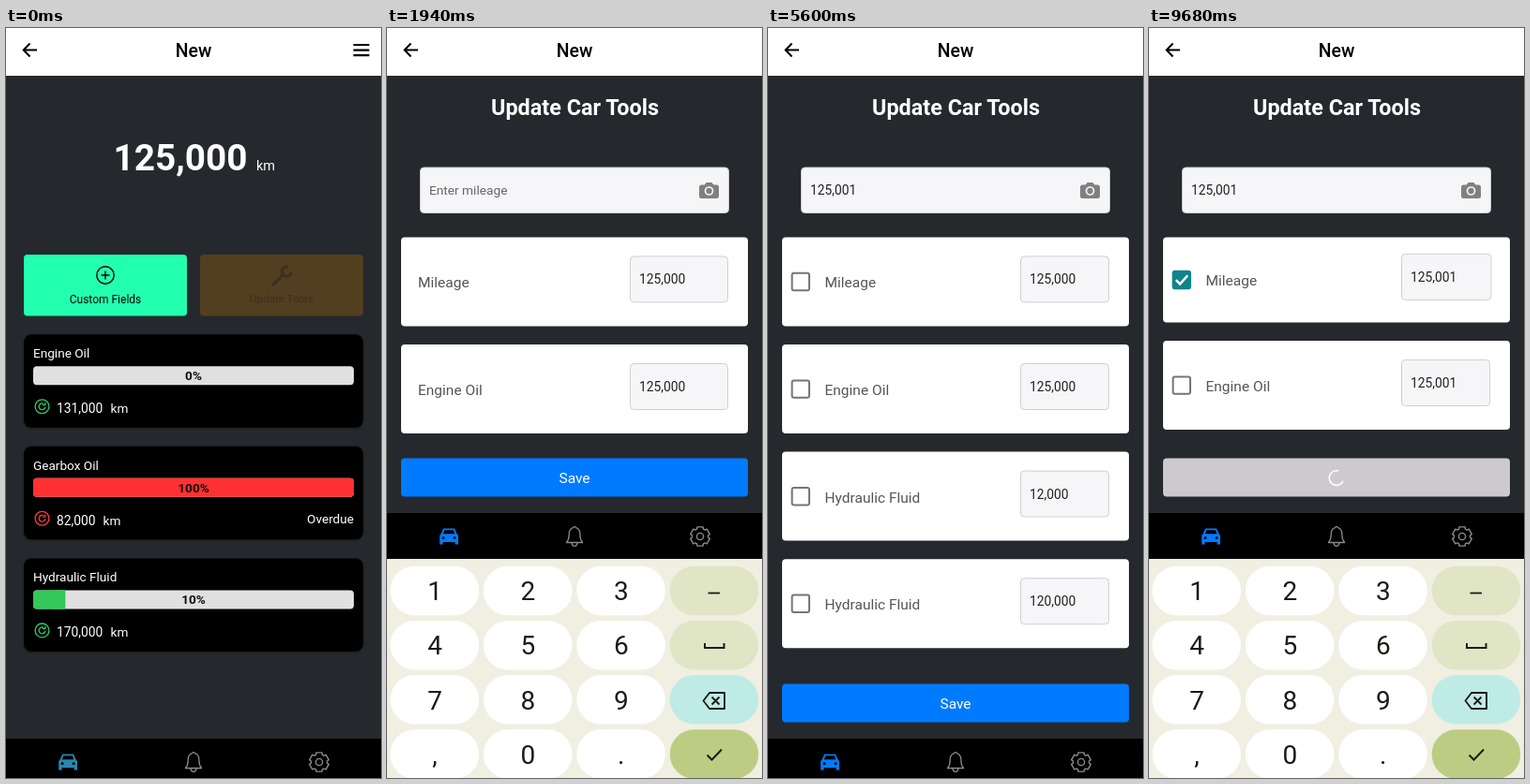
An HTML page that plays this animation: 400x801 px, repeating every 9.75 s.

```html
<!DOCTYPE html>
<html lang="en">
<head>
<meta charset="utf-8">
<title>Car tools</title>
<style>
  html, body { margin: 0; width: 100%; height: 100%; overflow: hidden; background: #fff; }
  svg { display: block; width: 400px; height: 801px; }
  text { font-family: Roboto, "Noto Sans", sans-serif; white-space: pre; }
</style>
</head>
<body>
<svg id="stage" viewBox="0 0 400 801" xmlns="http://www.w3.org/2000/svg"></svg>
<script>
const LOOP = 9750;
const BG = '#25292e';
const LIFT = 241;

// ---------- markup helpers ----------
const rect = (x, y, w, h, r, fill, more = '') =>
  `<rect x="${x}" y="${y}" width="${w}" height="${h}" rx="${r}" fill="${fill}" ${more}/>`;
const text = (x, y, size, fill, str, more = '') =>
  `<text x="${x}" y="${y}" font-size="${size}" fill="${fill}" ${more}>${str}</text>`;
const line = (d, color, w, more = '') =>
  `<path d="${d}" fill="none" stroke="${color}" stroke-width="${w}" ${more}/>`;
const mid = 'text-anchor="middle"';
const bold = 'font-weight="700"';
const round = 'stroke-linecap="round" stroke-linejoin="round"';

const header = menu =>
  rect(0, 0, 400, 51, 0, '#fff') +
  text(200, 31, 19.4, '#000', 'New', mid + ' font-weight="500"') +
  line('M33 23.5H19M25.5 16.5L18.7 23.5L25.5 30.5', '#000', 2) +
  (menu ? line('M370.5 18H387.5M370.5 23.6H387.5M370.5 29.2H387.5', '#000', 2.2) : '');

// ---------- home ----------
const reload = (y, color) =>
  `<g transform="translate(38.5 ${y})">` +
  `<circle r="7.4" fill="none" stroke="${color}" stroke-width="1.3"/>` +
  line('M3.4 .3A3.4 3.4 0 1 1 1.6 -3M3.3 -4.4V-1.7H.6', color, 1.3) + '</g>';

function meter(y, name, pct, color, value, kmX, note) {
  return rect(19, y, 362, 99.5, 8, '#000', 'filter="url(#soft)"') +
    text(29, y + 25, 13.6, '#fff', name) +
    rect(29, y + 34, 342, 20, 4, '#e0e0e0') +
    (pct ? rect(29, y + 34, 3.42 * pct, 20, 4, color) : '') +
    (pct && pct < 100 ? rect(50, y + 34, 3.42 * pct - 21, 20, 0, color) : '') +
    text(200, y + 49, 13.6, '#111', pct + '%', mid + ' ' + bold) +
    reload(y + 77, pct === 100 ? '#ff3b3b' : '#2ecc71') +
    text(54, y + 84, 13.8, '#fff', value) +
    text(kmX, y + 84, 13.6, '#fff', 'km') +
    (note ? text(371, y + 82, 13.6, '#fff', note, 'text-anchor="end"') : '');
}

const home =
  rect(0, 0, 400, 759, 0, BG) + header(true) +
  text(114.5, 152, 38.8, '#fff', '125,000', bold) +
  text(267, 152, 14.5, '#fff', 'km') +
  rect(19, 242, 174, 65.5, 4, '#22ffaf') +
  '<circle cx="106" cy="264" r="9.2" fill="none" stroke="#000" stroke-width="1.4"/>' +
  line('M101.5 264H110.5M106 259.5V268.5', '#000', 1.4) +
  text(106, 294, 12, '#000', 'Custom Fields', mid) +
  rect(207, 242, 174, 65.5, 4, '#523f20') +
  line('M285 274L296 263', '#3c3020', 3.6, round) +
  '<circle cx="299" cy="260" r="5" fill="none" stroke="#3c3020" stroke-width="3" stroke-dasharray="24 8" stroke-dashoffset="-1"/>' +
  text(294, 293, 11.6, '#3c3020', 'Update Tools', mid) +
  meter(327.3, 'Engine Oil', 0, '', '131,000', 111.5) +
  meter(446.8, 'Gearbox Oil', 100, '#ff3132', '82,000', 103.5, 'Overdue') +
  meter(566.4, 'Hydraulic Fluid', 10, '#34c759', '170,000', 111.5);

// ---------- form ----------
const field = 'stroke="#cfcfd2" stroke-width="1"';
const names = ['Mileage', 'Engine Oil', 'Hydraulic Fluid', 'Hydraulic Fluid'];

const cardMarkup = (name, i) =>
  `<g id="card${i}">` +
  rect(15, 0, 370, 95, 4, '#fff') +
  '<g class="box">' + rect(25.6, 38.4, 18.4, 18.4, 2, '#fff', 'stroke="#757575" stroke-width="2"') +
  line('M28.8 47.8L33 52L41.2 43', '#fff', 2.4, 'class="tick"') + '</g>' +
  text(33, 54, 15.5, '#555', name, 'class="name"') +
  rect(259.5, 20.5, 104, 49, 4, '#f6f5f7', field + ' class="field"') +
  text(269, 50, 13.8, '#222', '', 'class="value"') +
  rect(0, 35, 1.3, 20, 0, '#2aa8a0', 'class="caret"') + '</g>';

const camera =
  '<g fill="#808080"><rect x="333" y="167.5" width="21" height="14.5" rx="2.5"/>' +
  '<path d="M338 168.5L340.5 165H346.5L349 168.5Z"/></g>' +
  '<circle cx="343.5" cy="174" r="4" fill="none" stroke="#f6f5f8" stroke-width="1.7"/>';

const form =
  rect(0, 0, 400, 759, 0, BG) + header(false) +
  text(200.5, 92.5, 23.4, '#fff', 'Update Car Tools', mid + ' ' + bold) +
  rect(35.5, 149, 329, 48.5, 4, '#f6f5f8', field) + camera +
  text(45, 178, 13.8, '#222', '', 'id="entry"') +
  rect(0, 164, 1.3, 19, 0, '#2aa8a0', 'id="caret"') +
  `<g id="list" clip-path="url(#listClip)">${names.map(cardMarkup).join('')}</g>` +
  '<g id="save">' + rect(15, 700.5, 370, 41, 4, '#007bff', 'id="saveBg"') +
  text(200, 727, 15.5, '#fff', 'Save', mid + ' id="saveText"') +
  '<circle id="spin" cx="200" cy="721.5" r="7.8" fill="none" stroke="#fff" stroke-width="1.6" stroke-dasharray="35 14"/></g>';

// ---------- tab bar ----------
function gearPath() {
  const pts = [];
  for (let i = 0; i < 6; i++) {
    for (const [off, r] of [[-17, 10.6], [17, 10.6], [23, 8.6], [37, 8.6]]) {
      const a = (i * 60 + off) * Math.PI / 180;
      pts.push((334 + r * Math.sin(a)).toFixed(1) + ' ' + (784 - r * Math.cos(a)).toFixed(1));
    }
  }
  return 'M' + pts.join('L') + 'Z';
}

const tabs =
  rect(0, 759, 400, 49, 0, '#000') +
  '<path id="car" fill-rule="evenodd" d="M60.2 775.5H72L74.6 781.2L76 783V792.5H72.6V790H59.6V792.5H56.2V783L57.6 781.2Z' +
  'M61.4 777.3L59.8 781.2H72.4L70.8 777.3ZM58.6 785.5a1.5 1.5 0 1 0 3 0a1.5 1.5 0 1 0 -3 0ZM70.6 785.5a1.5 1.5 0 1 0 3 0a1.5 1.5 0 1 0 -3 0Z"/>' +
  line('M191.5 790.5C195.5 786 193.5 782 194.6 778.5C195.5 775.5 197.5 775 198.6 774.6Q200 772 201.5 774.6C202.6 775 204.6 775.5 205.5 778.5C206.6 782 204.6 786 208.6 790.5ZM197 791Q197.4 794.3 200 794.3T203 791', '#8a8a8e', 1.3, round) +
  line(gearPath(), '#8a8a8e', 1.4, round) +
  '<circle cx="334" cy="784" r="3.6" fill="none" stroke="#8a8a8e" stroke-width="1.4"/>';

// ---------- keyboard ----------
const rows = ['123-', '456_', '789<', ',0.!'];
const keyColor = { '-': '#e0e5c5', '_': '#e0e5c5', '<': '#bfebe6', '!': '#bccd83' };
const icons = {
  '-': line('M342.5 603.5H355', '#1b1c17', 1.8),
  '_': line('M339 657V662H359.5V657', '#1b1c17', 2),
  '<': line('M344 710H360V727H344L337.5 718.5ZM346.5 714.5L354.5 722.5M354.5 714.5L346.5 722.5', '#1b1c17', 1.9, 'stroke-linejoin="round"'),
  '!': line('M341.5 776.5L346.5 781.5L357 770.5', '#1b1c17', 2)
};

const keys = rows.map((row, j) => [...row].map((c, i) => {
  const x = 3.5 + i * 99.4, y = 574.7 + j * 58.2;
  return rect(x, y, 94.5, 52.5, 26, keyColor[c] || '#fff') +
    (icons[c] || text(x + 47.5, y + 36.5, 28, '#1b1c17', c, mid)) +
    rect(x, y, 94.5, 52.5, 26, '#5b6040', `data-key="${c}" opacity="0"`);
}).join('')).join('');

const stage = document.getElementById('stage');
stage.innerHTML =
  '<defs><filter id="soft" x="-5%" y="-10%" width="110%" height="125%">' +
  '<feDropShadow dx="0" dy="1" stdDeviation="1.5" flood-opacity=".4"/></filter>' +
  '<clipPath id="listClip"><rect id="listBox" x="0" y="205" width="400" height="240"/></clipPath></defs>' +
  rect(0, 0, 400, 801, 0, '#fff') +
  `<g id="home">${home}</g><g id="form">${form}</g>` +
  '<g id="under">' + rect(0, 567, 400, 234, 0, '#fdfdfd') + rect(0, 567, 1, 234, 0, '#b5b5b5') + '</g>' +
  `<g id="tabs">${tabs}</g>` +
  `<g id="keys">${rect(0, 567, 400, 240, 0, '#f0efe2')}${keys}</g>`;

const $ = id => document.getElementById(id);
const set = (el, attrs) => { for (const k in attrs) el.setAttribute(k, attrs[k]); };
const show = (el, on) => { el.style.display = on ? '' : 'none'; };
const write = (el, str) => { if (el.textContent !== str) el.textContent = str; };
const cards = names.map((_, i) => {
  const root = $('card' + i), part = c => root.querySelector('.' + c);
  return { root, box: part('box'), frame: part('box').firstChild, tick: part('tick'),
    name: part('name'), field: part('field'), value: part('value'), caret: part('caret') };
});
const pads = [...stage.querySelectorAll('[data-key]')];

// ---------- timeline ----------
const entrySteps = [[0, ''], [2150, '1'], [2480, '2'], [2800, '5'], [3250, '0'], [3560, '0'], [3900, '1']];
const engineSteps = [[0, '125,000'], [8230, '125,00'], [8650, '125,001']];
const presses = [[2080, '1'], [2430, '2'], [2760, '5'], [3200, '0'], [3510, '0'], [3850, '1'],
  [4820, '!'], [8170, '<'], [8590, '1']];
const CARDS_AT = 560, BOXES_AT = 2150, CHECK_AT = 6150, BUSY_AT = 9330;

const clamp = v => Math.max(0, Math.min(1, v));
const ramp = (t, a, b) => clamp((t - a) / (b - a));
const out = (p, n = 2.5) => 1 - Math.pow(1 - p, n);
const about = s => `translate(200 400) scale(${s}) translate(-200 -400)`;
const blink = (t, from) => t >= from && (t - from) % 1000 < 500;

function drawCards(t) {
  const boxes = t >= BOXES_AT, checked = t >= CHECK_AT;
  const engine = engineSteps.filter(s => s[0] <= t).pop()[1];
  const values = [checked ? '125,001' : '125,000', engine, '12,000', '120,000'];
  cards.forEach((c, i) => {
    const on = checked && i === 0;
    const y = 223.4 + i * 114.6 - (checked && i ? 4 : 0);
    set(c.root, { transform: `translate(0 ${y})` });
    set(c.root.firstChild, { height: on ? 91 : 95 });
    show(c.box, boxes);
    show(c.tick, on);
    set(c.box, { transform: `translate(0 ${on ? -2 : 0})` });
    set(c.frame, { fill: on ? '#0f8489' : '#fff', stroke: on ? '#0f8489' : '#757575' });
    set(c.name, { x: boxes ? 60.5 : 33, y: on ? 52 : 54 });
    set(c.field, { x: boxes ? 269.5 : 259.5, y: on ? 18 : 20.5, width: on ? 95.5 : boxes ? 94 : 104 });
    set(c.value, { x: boxes ? 279 : 269, y: on ? 48 : 50 });
    write(c.value, values[i]);
    const caret = i === 1 && t < BUSY_AT && blink(t, 7100);
    show(c.caret, caret);
    if (caret) set(c.caret, { x: 279.5 + c.value.getComputedTextLength() });
  });
}

function draw(t) {
  const enter = ramp(t, 70, 470);
  show($('home'), t < 330);
  set($('home'), { transform: about(1 + .1 * out(enter)), opacity: 1 - ramp(t, 150, 320) });
  show($('form'), t >= 70);
  set($('form'), { transform: about(.85 + .15 * out(enter)), opacity: ramp(t, 70, 220) });

  const up = (t >= 1150 && t < 5100) || t >= 7150;
  const lift = `translate(0 ${up ? -LIFT : 0})`;
  set($('save'), { transform: lift });
  set($('tabs'), { transform: lift });
  set($('listBox'), { height: up ? 240 : 480 });
  show($('under'), up);
  set($('car'), { fill: t < CARDS_AT ? '#2a85b0' : '#007bff' });

  const slide = t < 5000
    ? out(ramp(t, 1250, 1530))
    : t < 7000 ? 1 - out(ramp(t, 5050, 5290), 2) : out(ramp(t, 7200, 7480));
  show($('keys'), slide > 0);
  set($('keys'), { transform: `translate(0 ${(1 - slide) * 236})` });
  pads.forEach(p => {
    const hit = presses.some(([a, c]) => c === p.dataset.key && t >= a && t < a + 130);
    set(p, { opacity: hit ? .16 : 0 });
  });

  const digits = entrySteps.filter(s => s[0] <= t).map(s => s[1]).join('');
  const entry = $('entry'), caret = $('caret');
  write(entry, digits ? Number(digits).toLocaleString('en-US') : 'Enter mileage');
  set(entry, { fill: digits ? '#222' : '#666', 'font-size': digits ? 13.8 : 13.7 });
  const typing = t > 2080 && t < 4000;
  const caretOn = t < 5000 && (typing || blink(t, 1080));
  show(caret, caretOn);
  if (caretOn) set(caret, { x: digits ? 45 + entry.getComputedTextLength() : 44.6 });

  show($('list'), t >= CARDS_AT);
  if (t >= CARDS_AT) drawCards(t);

  const busy = t >= BUSY_AT;
  set($('saveBg'), { fill: busy ? '#cccacc' : '#007bff' });
  show($('saveText'), !busy);
  show($('spin'), busy);
  set($('spin'), { transform: `rotate(${(t - BUSY_AT) * .36 - 100} 200 721.5)` });
}

const start = performance.now();
function tick() {
  draw((performance.now() - start) % LOOP);
  requestAnimationFrame(tick);
}
tick();
</script>
</body>
</html>
```
